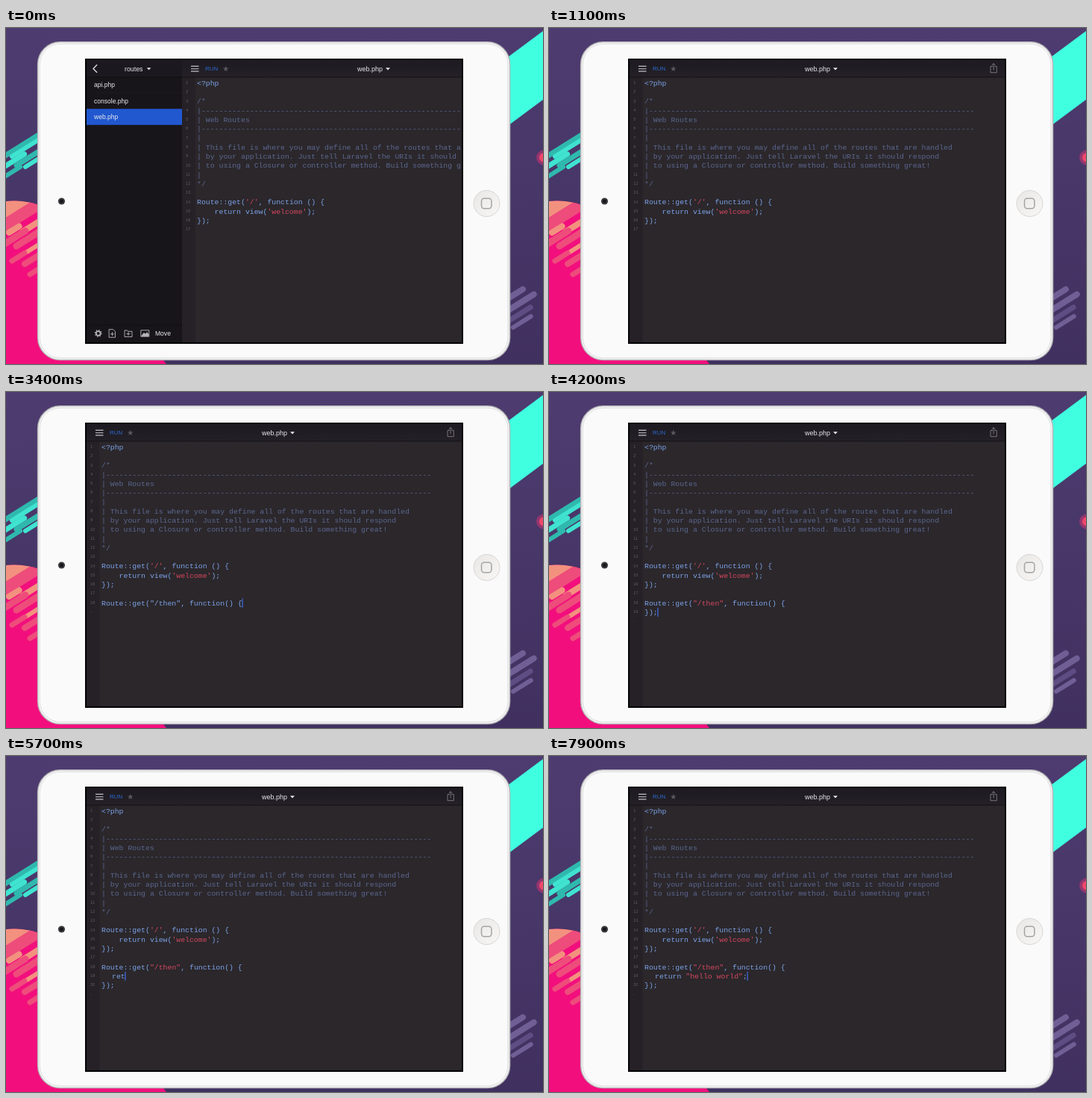
An HTML page that plays this animation: 720 by 450 pixels, repeating every 8 s.

```html
<!DOCTYPE html>
<html lang="en">
<head>
<meta charset="utf-8">
<title>Code editor on a tablet</title>
<style>
html, body { margin: 0; width: 100%; height: 100%; overflow: hidden; background: #4b3a6c; }
svg { display: block; width: 720px; height: 450px; }
text { white-space: pre; }
.ui { font-family: "Liberation Sans", Arial, sans-serif; font-size: 8.55px; fill: #e9e7ec; }
.title { font-size: 9px; }
.code { font-family: "Liberation Mono", "Courier New", monospace; font-size: 9.833px; fill: #7da3e8; }
.note { fill: #5c6890; }
.str { fill: #d5485f; }
.num { font-family: "Liberation Sans", Arial, sans-serif; font-size: 5.4px; fill: #625e66; }
.line { fill: none; stroke-linecap: round; stroke-linejoin: round; }
</style>
</head>
<body>
<svg viewBox="0 0 720 450" xmlns="http://www.w3.org/2000/svg">
  <defs>
    <linearGradient id="sky" x1="0" y1="0" x2="0" y2="1">
      <stop offset="0" stop-color="#4e3c70"/>
      <stop offset="1" stop-color="#40305f"/>
    </linearGradient>
    <linearGradient id="bar" x1="0" y1="0" x2="0" y2="1">
      <stop offset="0" stop-color="#1d1a21"/>
      <stop offset="1" stop-color="#242027"/>
    </linearGradient>
    <linearGradient id="home" x1="0" y1="0" x2="1" y2="1">
      <stop offset="0" stop-color="#e9e7e5"/>
      <stop offset="1" stop-color="#f8f7f6"/>
    </linearGradient>
    <clipPath id="screen"><rect x="108" y="43" width="503" height="378"/></clipPath>
    <clipPath id="disc"><path d="M0 232C18 230 34 233 50 239V450H0z"/></clipPath>
  </defs>

  <rect width="720" height="450" fill="url(#sky)"/>
  <path d="M0 232C18 230 34 233 50 239L215 450H0z" fill="#f20f7d"/>
  <g id="decor" class="line"></g>
  <path d="M720 4L650 56V148L720 96z" fill="#40ffe0"/>
  <circle cx="721" cy="173.500" r="10" fill="#93366f"/>
  <circle cx="721" cy="173.500" r="6" fill="#f0476a"/>

  <rect x="42.700" y="18.700" width="632.800" height="425.800" rx="30" fill="#fdfdfd" stroke="#b9b8ba" stroke-width="1.600"/>
  <rect x="45.200" y="21.200" width="627.800" height="420.800" rx="27.500" fill="#fafafb" stroke="#d9d8da" stroke-width="1"/>
  <circle cx="74.500" cy="232" r="4.600" fill="#3c3b3e"/>
  <circle cx="74.500" cy="232" r="2.500" fill="#17171b"/>
  <circle cx="644.500" cy="235" r="17.500" fill="url(#home)" stroke="#d8d6d4"/>
  <rect x="637.500" y="228.300" width="13.400" height="13.400" rx="3.600" fill="none" stroke="#a6a4a4" stroke-width="1.500"/>
  <rect x="106" y="41" width="507" height="382" fill="#030304"/>

  <g clip-path="url(#screen)">
    <rect x="108" y="43" width="503" height="378" fill="#2b272b"/>
    <g id="editor">
      <rect x="108" y="43" width="503" height="378" fill="#2b272b"/>
      <rect x="108" y="66" width="17.500" height="355" fill="#252126"/>
      <rect x="108" y="43" width="503" height="22.500" fill="url(#bar)"/>
      <path d="M108 65.800H611" stroke="#131116" stroke-width="1"/>
      <path d="M120 51.200h10.500M120 54.600h10.500M120 58h10.500" stroke="#aaa7ad" stroke-width="1.400"/>
      <text class="ui" x="139" y="57.300" style="font-size:7.900px;fill:#2c6bd2">RUN</text>
      <path id="star" fill="#5b5860"/>
      <text class="ui title" x="343" y="57.500">web.php</text>
      <path d="M381 53.200h6l-3 3.200z" fill="#e9e7ec"/>
      <path class="line" d="M594.500 51.500H592V59.700H600.300V51.500H597.800M596.100 56V47.800M593.900 49.800L596.100 47.600L598.300 49.800" stroke="#807d84" stroke-width=".9"/>
      <g id="nums"></g>
      <g id="lines"></g>
      <rect id="caret" width="1.300" height="12" fill="#3d69dc"/>
    </g>
    <g id="files">
      <rect x="108" y="43" width="128" height="378" fill="#18151a"/>
      <rect x="108" y="43" width="128" height="22.500" fill="#1b181f"/>
      <path d="M108 65.800H236M108 398H236" stroke="#100e12"/>
      <path class="line" d="M121.700 49.600L117 54.400L121.700 59.200" stroke="#d6d4d9" stroke-width="1.500"/>
      <text class="ui" x="159" y="57.500" style="font-size:8.800px">routes</text>
      <path d="M188.800 53.200h5.600l-2.800 3z" fill="#e9e7ec"/>
      <path d="M118 86.700H236" stroke="#211e24" stroke-width=".6"/>
      <rect x="108" y="108.300" width="128" height="21.500" fill="#2158d0"/>
      <text class="ui" x="118" y="79">api.php</text>
      <text class="ui" x="118" y="100.500">console.php</text>
      <text class="ui" x="118" y="122">web.php</text>
      <g class="line" stroke="#b9b7bc" stroke-width=".9">
        <circle cx="123.700" cy="409" r="2.900" stroke-width="1.700"/>
        <circle cx="123.700" cy="409" r="4.400" stroke-width="1.200" stroke-dasharray="1.400 2.056" stroke-linecap="butt"/>
        <path d="M138.500 403.700H143.700L146.500 406.500V414.300H138.500zM142.500 407.600V412M140.300 409.800H144.700"/>
        <path d="M159 413.200V405H162.500L163.500 406.300H169V413.200zM164 407.600V411.600M162 409.600H166"/>
        <rect x="181.200" y="404.800" width="10.600" height="8.400"/>
        <path d="M182 412L185 408.300L187 410.300L189 407.700L191.200 410.800V412.600H182z" fill="#b9b7bc"/>
      </g>
      <text class="ui" x="200" y="412">Move</text>
    </g>
  </g>
</svg>
<script>
const LOOP = 8000, X0 = 128, Y0 = 76.8, STEP = 12.28, CHAR = 5.9, TAB = 14;
const $ = id => document.getElementById(id);
const NS = "http://www.w3.org/2000/svg";
const make = (parent, tag, attrs) => {
  const el = parent.appendChild(document.createElementNS(NS, tag));
  for (const k in attrs) el.setAttribute(k, attrs[k]);
  return el;
};
const rowY = n => Y0 + (n - 1) * STEP;

// Slanted capsules: x, y, length, width, colour
const capsule = (x, y, len, w, color, clip) => make($("decor"), "path", {
  d: `M${x} ${y}l${len * .85} ${-len * .53}`, stroke: color, "stroke-width": w,
  ...(clip && { "clip-path": "url(#disc)" })
});
[
  [-6, 174, 62, 7, "#2fb9ae"], [8, 172, 50, 6, "#3fe3d0"], [-6, 188, 36, 7, "#3fe3d0"],
  [14, 184, 40, 7, "#2fb9ae"], [-8, 203, 32, 6, "#2fb9ae"], [26, 186, 26, 6, "#3fe3d0"]
].forEach(c => capsule(...c));
[
  [-8, 244, 70, 26, "#f3917f"], [-8, 268, 70, 16, "#ee4c7b"], [4, 274, 16, 8, "#f3917f"],
  [22, 273, 34, 8, "#f3917f"], [-8, 293, 40, 9, "#ee4c7b"], [14, 292, 44, 9, "#ee4c7b"],
  [28, 300, 30, 6, "#f3917f"], [8, 312, 20, 7, "#ee4c7b"], [25, 316, 30, 8, "#ee4c7b"],
  [32, 330, 24, 7, "#ee4c7b"]
].forEach(c => capsule(...c, true));
[
  [664, 368, 34, 8, "#6f5f95"], [672, 379, 42, 8, "#6f5f95"],
  [676, 391, 32, 7, "#5d4d83"], [680, 401, 28, 6, "#6f5f95"]
].forEach(c => capsule(...c));

$("star").setAttribute("d", "M" + Array.from({ length: 10 }, (_, i) => {
  const a = i * Math.PI / 5, r = i % 2 ? 1.7 : 4;
  return `${(166.7 + r * Math.sin(a)).toFixed(2)} ${(54.8 - r * Math.cos(a)).toFixed(2)}`;
}).join("L") + "z");

const dashes = "|" + "-".repeat(74);
const fixed = [
  "<?php", "", "/*", dashes, "| Web Routes", dashes, "|",
  "| This file is where you may define all of the routes that are handled",
  "| by your application. Just tell Laravel the URIs it should respond",
  "| to using a Closure or controller method. Build something great!",
  "|", "*/", "", "Route::get('/', function () {", "    return view('welcome');", "});"
];

// Quoted parts become strings when colour is on
function setCode(el, text, color) {
  const key = text + color;
  if (el.key === key) return;
  el.key = key;
  el.textContent = "";
  const parts = color ? text.split(/("[^"]*"|'[^']*')/) : [text];
  parts.forEach((p, i) => {
    if (p) make(el, "tspan", i % 2 ? { class: "str" } : {}).textContent = p;
  });
}
const codeLine = (n, cls = "") =>
  make($("lines"), "text", { class: "code " + cls, x: X0, y: rowY(n) });

fixed.forEach((s, i) => setCode(codeLine(i + 1, i > 1 && i < 12 ? "note" : ""), s, i > 11));
const live = [18, 19, 20].map(n => codeLine(n));
const nums = Array.from({ length: 21 }, (_, i) =>
  make($("nums"), "text", { class: "num", x: 113.3, y: rowY(i + 1) - 1.8 }));

// Typing bursts: text, start, end
const head = [['Route::get("/then', 1430, 2350], ['", function() {', 2450, 3350]];
const close = [["});", 3700, 4150]];
const body = [["return", 5500, 5850], [' "hell', 6000, 6450], ["o world", 6550, 7100], ['"', 7250, 7250], [";", 7700, 7700]];
const typed = (bursts, t) => bursts.map(([s, a, b]) => {
  if (t < a) return "";
  return b > a ? s.slice(0, 1 + Math.floor((t - a) / (b - a) * (s.length - 1))) : s;
}).join("");

function draw(t) {
  const p = Math.min(1, Math.max(0, (t - 250) / 450));
  const ease = p * p * (3 - 2 * p);
  $("editor").setAttribute("transform", `translate(${128 * (1 - ease)} 0)`);
  $("files").setAttribute("transform", `translate(${-128 * ease} 0)`);

  const top = typed(head, t), end = typed(close, t), inner = typed(body, t);
  const split = t >= 4600;
  const last = t < 1300 ? 17 : t < 3500 ? 18 : split ? 20 : 19;
  setCode(live[0], top, t >= 3500);
  setCode(live[1], split ? inner : end, t >= 7350);
  setCode(live[2], split ? end : "", false);
  live[1].setAttribute("x", split ? X0 + TAB : X0);
  nums.forEach((el, i) => {
    const s = i < last ? String(i + 1) : i === last && last > 17 ? "-" : "";
    if (el.textContent !== s) el.textContent = s;
  });

  let row = last, x = X0;
  if (t < 3500) x += top.length * CHAR;
  else if (t < 4350) x += end.length * CHAR;
  else if (t >= 5200) {
    row = 19;
    if (t >= 5400) x += TAB + inner.length * CHAR;
  }
  $("caret").setAttribute("x", x - .4);
  $("caret").setAttribute("y", rowY(row) - 9);
  $("caret").setAttribute("visibility", t < 1200 ? "hidden" : "visible");
}

const start = performance.now();
function tick(now) {
  draw(Math.max(0, now - start) % LOOP);
  requestAnimationFrame(tick);
}
draw(0);
requestAnimationFrame(tick);
</script>
</body>
</html>
```
